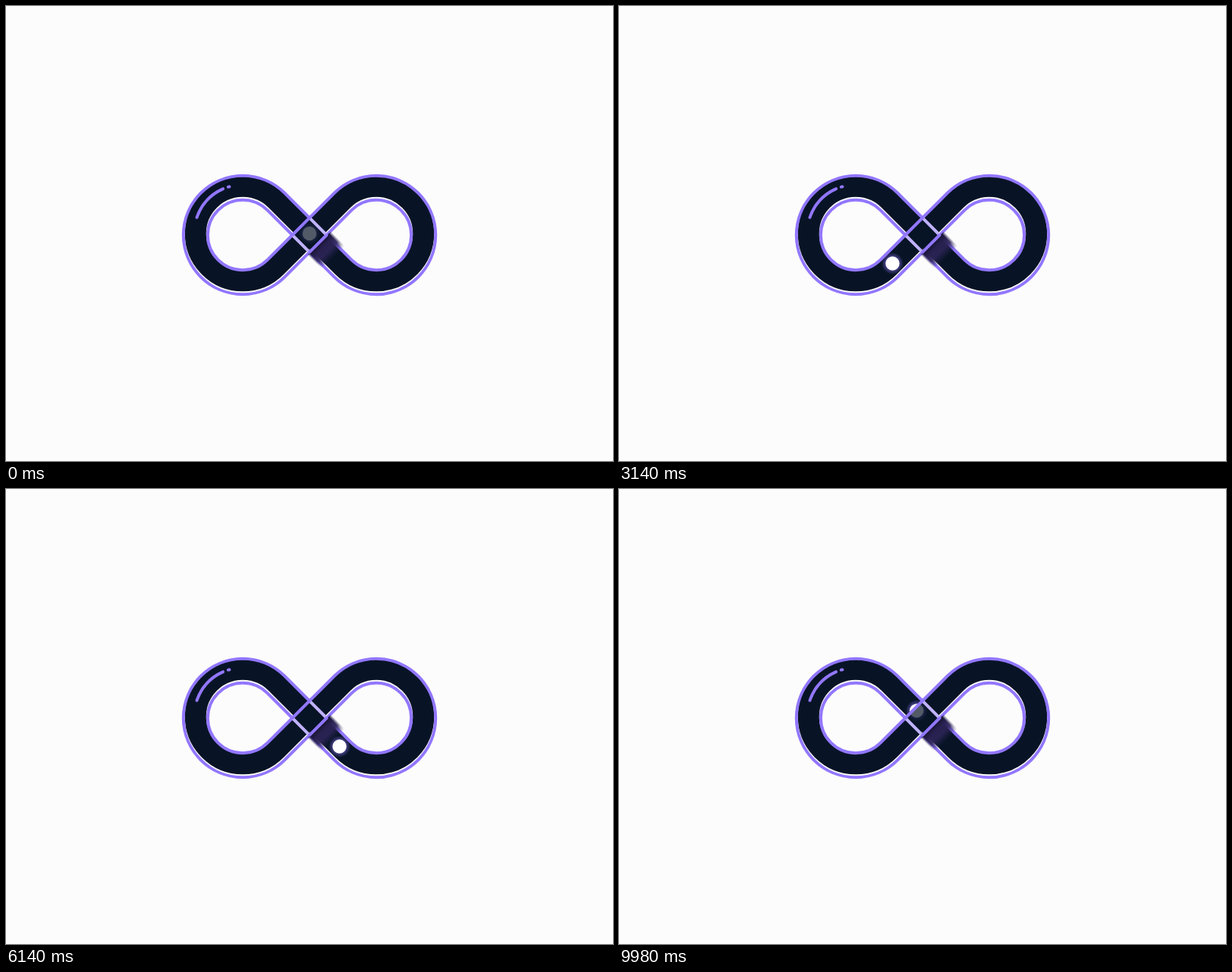
These frames come from a looping animation (800 by 600 pixels, 10000 ms). An HTML page:

```html
<!DOCTYPE html>
<html lang="en">
<head>
<meta charset="utf-8">
<title>Infinity loader</title>
<style>
  html, body { margin: 0; width: 100%; height: 100%; overflow: hidden; background: #fcfcfc; }
  svg { display: block; width: 800px; height: 600px; }
  .line { fill: none; stroke: #9277ff; stroke-width: 4; stroke-linejoin: round; stroke-linecap: round; }
  .cross { stroke: #c0b2fb; stroke-linecap: butt; }
  .ball {
    offset-path: path("M400 300 L444 344 A62.23 62.23 0 1 0 444 256 L356 344 A62.23 62.23 0 1 1 356 256 Z");
    offset-rotate: 0deg;
    animation: travel 2s linear 7ms infinite backwards;
  }
  .over { animation: travel 2s linear 7ms infinite backwards, surface 2s step-end 7ms infinite backwards; }
  @keyframes travel { from { offset-distance: 0%; } to { offset-distance: 100%; } }
  /* the ball rides over the bridge on its second pass only */
  @keyframes surface { 0% { opacity: 0; } 46% { opacity: 1; } 54% { opacity: 0; } }
</style>
</head>
<body>
<svg viewBox="0 0 800 600">
  <defs>
    <radialGradient id="glow">
      <stop offset=".58" stop-color="#9277ff" stop-opacity=".5"/>
      <stop offset="1" stop-color="#9277ff" stop-opacity="0"/>
    </radialGradient>
    <linearGradient id="shade">
      <stop offset="0" stop-color="#14122f"/>
      <stop offset=".3" stop-color="#282150"/>
      <stop offset=".6" stop-color="#2d2558" stop-opacity=".9"/>
      <stop offset="1" stop-color="#2d2558" stop-opacity="0"/>
    </linearGradient>
    <linearGradient id="sides" x2="0" y2="1">
      <stop offset="0" stop-color="#000"/>
      <stop offset=".1" stop-color="#fff"/>
      <stop offset=".9" stop-color="#fff"/>
      <stop offset="1" stop-color="#000"/>
    </linearGradient>
    <mask id="soft"><rect y="-22" width="30" height="44" fill="url(#sides)"/></mask>
    <g id="dot">
      <circle r="14.5" fill="url(#glow)"/>
      <circle r="9.2" fill="#fff"/>
    </g>
  </defs>

  <path d="M400 300 L444 344 A62.23 62.23 0 1 0 444 256 L356 344 A62.23 62.23 0 1 1 356 256 Z"
        fill="none" stroke="#081426" stroke-width="28"/>
  <path class="line" d="M251.5 278.8 A64.4 64.4 0 0 1 286 241.1 M292.8 238.6 L294.4 238.3"/>

  <g class="ball"><use href="#dot"/></g>

  <g class="line">
    <path d="M400 279.4 L432.7 246.7 A78.2 78.2 0 1 1 432.7 357.3 L400 324.6 L367.3 357.3 A78.2 78.2 0 1 1 367.3 246.7 Z"/>
    <path d="M377.4 302 L344.7 334.7 A46.2 46.2 0 1 1 344.7 269.3 Z"/>
    <path d="M422.6 302 L455.3 269.3 A46.2 46.2 0 1 1 455.3 334.7 Z"/>
  </g>

  <g transform="translate(412.5 312.5) rotate(45)">
    <rect y="-22" width="27" height="44" fill="url(#shade)" mask="url(#soft)"/>
  </g>

  <path d="M400 279.4 L422.6 302 L400 324.6 L377.4 302 Z" fill="#081426" opacity=".7"/>
  <path class="line cross" d="M400 279.4 L422.6 302 M377.4 302 L400 324.6"/>
  <path class="line" d="M377.4 302 L400 279.4 M400 324.6 L422.6 302"/>

  <g class="ball over"><use href="#dot"/></g>
</svg>
</body>
</html>
```
